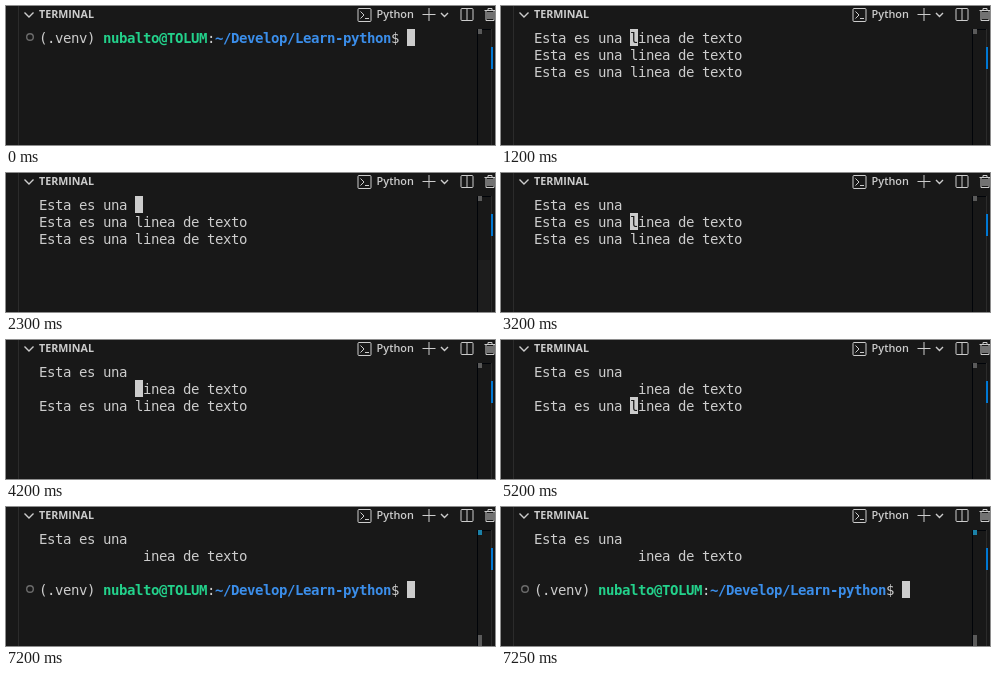
Animation, 489 px wide and 139 px high, one loop 8000 ms. Source, as an HTML page:

```html
<!DOCTYPE html>
<html lang="es">
<head>
<meta charset="utf-8">
<title>Terminal</title>
<style>
  html, body { margin: 0; width: 100%; height: 100%; overflow: hidden; background: #181818; }
  svg { display: block; width: 489px; height: 139px; }
  .mono { font: 14px "DejaVu Sans Mono", monospace; fill: #ccc; white-space: pre; letter-spacing: var(--gap); }
  .ui { font-family: "Open Sans", "Noto Sans", sans-serif; fill: #ccc; }
  .icon { fill: none; stroke: #ccc; stroke-width: 1; }
  .chevron { stroke-width: 1.4; }
  .bold { font-weight: 700; }
</style>
</head>
<body>
<svg viewBox="0 0 489 139">
  <rect width="489" height="139" fill="#181818"/>
  <rect x="12" width="1" height="139" fill="#2b2b2b"/>

  <path class="icon chevron" d="M18.5 6.5l4.5 4.5 4.5-4.5"/>
  <text class="ui" x="33" y="12" font-size="10.7" font-weight="700">TERMINAL</text>
  <g class="icon">
    <rect x="352" y="2.5" width="13" height="13" rx="1"/>
    <path d="M354.5 5.5l3.5 3.5-3.5 3.5M359 12.5h4"/>
  </g>
  <text class="ui" x="370.6" y="12.3" font-size="10.9" font-weight="600">Python</text>
  <g class="icon" transform="translate(-.5 0)">
    <path d="M417 8.5h13M423.5 2v13"/>
    <path class="chevron" d="M435.5 7l3.5 3.5 3.5-3.5"/>
    <rect x="455.5" y="2.5" width="12" height="12" rx="1"/>
    <path d="M461.5 2.5v12"/>
    <path d="M479 4.5h11M482.5 4.5v-2h4v2M480.5 4.5v10h8v-10M482.5 6v7M484.5 6v7M486.5 6v7"/>
  </g>

  <path d="M485 23.5h-13.5V139" fill="none" stroke="#010409"/>
  <rect id="slider" x="472" y="87" width="12" height="52" fill="#414141"/>
  <rect id="mark" x="472" y="23" width="4" height="5"/>
  <rect id="newMark" x="472" y="128" width="4" height="11" fill="#5a5a5a"/>
  <rect x="485" y="23" width="1" height="116" fill="#2b2b2b"/>
  <rect x="485" y="41" width="2" height="22" fill="#0078d4"/>

  <g id="lines"></g>
  <g id="prompt">
    <circle cx="24" cy="8" r="3.3" fill="none" stroke="#6c6c6c" stroke-width="1.4"/>
  </g>
  <rect id="cursor" width="8" height="17" fill="#ccc"/>
  <text id="covered" class="mono" style="fill:#181818">l</text>
</svg>
<script>
const LOOP = 8000, LEFT = 33, TOP = 23, CELL = 8, ROW = 17, BASE = 14;
const $ = id => document.getElementById(id);
const colX = col => LEFT + col * CELL;
const rowY = row => TOP + row * ROW;

function addText(parent, col, y, content, bold, color) {
  const text = document.createElementNS("http://www.w3.org/2000/svg", "text");
  text.setAttribute("class", bold ? "mono bold" : "mono");
  text.setAttribute("x", colX(col));
  text.setAttribute("y", y);
  text.textContent = content;
  if (color) text.style.fill = color;
  parent.append(text);
  return text;
}

// The terminal grid rounds the glyph advance down to whole pixels.
const measure = document.createElement("canvas").getContext("2d");
measure.font = '14px "DejaVu Sans Mono", monospace';
const gap = CELL - measure.measureText("M").width;
document.documentElement.style.setProperty("--gap", gap + "px");

const LINE = "Esta es una linea de texto", SPLIT = 12;
const prompt = $("prompt");
addText(prompt, 0, BASE, "(.venv)");
addText(prompt, 8, BASE, "nubalto@TOLUM", true, "#23d18b");
addText(prompt, 21, BASE, ":");
addText(prompt, 22, BASE, "~/Develop/Learn-python", true, "#3b8eea");
addText(prompt, 44, BASE, "$");

// Each line is split around the cursor column so its parts can be erased.
const parts = [0, 1, 2].map(row => {
  const y = rowY(row) + BASE, group = $("lines");
  return {
    head: addText(group, 0, y, LINE.slice(0, SPLIT)),
    letter: addText(group, SPLIT, y, LINE[SPLIT]),
    tail: addText(group, SPLIT + 1, y, LINE.slice(SPLIT + 1))
  };
});

const show = (el, on) => el.setAttribute("visibility", on ? "visible" : "hidden");
const place = (el, x, y) => { el.setAttribute("x", x); el.setAttribute("y", y); };

const FADE = [[0, 0], [1250, .5], [1300, 1], [2050, .85], [2200, .6], [2250, .4], [2300, .12], [3200, 0]];
const stepAt = (steps, t) => steps.filter(([start]) => t >= start).pop()[1];

function render(t) {
  const output = t >= 1200, done = t >= 7200, atPrompt = !output || done;
  const cursorRow = done ? 3 : t >= 5200 ? 2 : t >= 3200 ? 1 : 0;
  const cursorCol = atPrompt ? 46 : SPLIT;
  const visible = [
    { head: true, letter: t < 2200, tail: t < 2200 },
    { head: t < 4200, letter: t < 4200, tail: true },
    { head: t < 6200, letter: t < 6200, tail: t < 6200 }
  ];
  parts.forEach((part, row) => {
    for (const key in part) show(part[key], output && visible[row][key]);
  });

  show(prompt, atPrompt);
  prompt.setAttribute("transform", `translate(0 ${rowY(done ? 3 : 0)})`);

  place($("cursor"), colX(cursorCol), rowY(cursorRow));
  place($("covered"), colX(cursorCol), rowY(cursorRow) + BASE);
  show($("covered"), !atPrompt && visible[cursorRow].letter);

  $("slider").setAttribute("opacity", stepAt(FADE, t));
  $("mark").setAttribute("fill", done ? "#1b81a8" : "#5a5a5a");
  show($("newMark"), done);
}

const start = performance.now();
function tick() {
  render((performance.now() - start) % LOOP);
  requestAnimationFrame(tick);
}
render(0);
requestAnimationFrame(tick);
</script>
</body>
</html>
```
